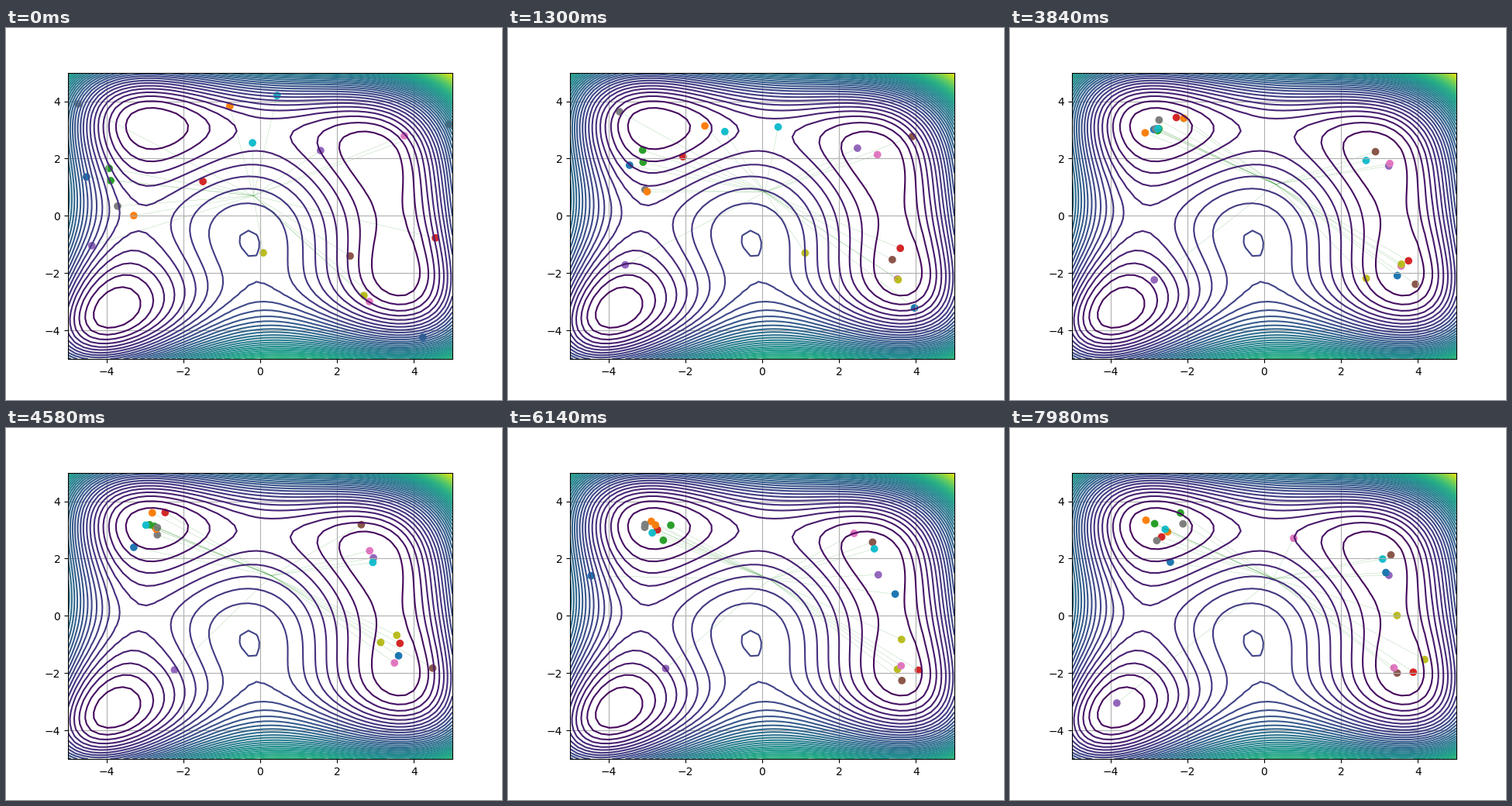
Recreate the animation shown at these times as a matplotlib script. Size 640 by 480 pixels, loop 8 s.

```python
import numpy as np
import matplotlib.pyplot as plt
from matplotlib.animation import FuncAnimation
from matplotlib.collections import LineCollection

STEP = 20      # ms per frame
FRAMES = 400
SPEED = 0.85   # descent speed, units per second
NOISE = 0.9    # strength of the random drift once settled
MEMORY = 0.4   # how long a drift lasts, in s

# starting swarm in colour order, two rounds of ten
START = np.array([
    (-4.52, 1.36), (-0.79, 3.83), (-3.93, 1.66), (-1.49, 1.20), (1.57, 2.28),
    (4.92, 3.20), (3.75, 2.80), (-3.71, 0.34), (0.08, -1.29), (0.44, 4.20),
    (4.23, -4.24), (-3.29, 0.01), (-3.89, 1.23), (4.56, -0.77), (-4.38, -1.04),
    (2.34, -1.40), (2.84, -2.99), (-4.74, 3.91), (2.70, -2.78), (-0.20, 2.55),
])


def himmelblau(x, y):
    return (x**2 + y - 11) ** 2 + (x + y**2 - 7) ** 2


def gradient(p):
    x, y = p.T
    a, b = x**2 + y - 11, x + y**2 - 7
    return np.column_stack([4 * x * a + 2 * b, 2 * a + 4 * y * b])


def descend():
    """Walk downhill at even speed, with random drift growing over time."""
    rng = np.random.default_rng(4)
    dt = STEP / 1000
    keep = np.exp(-dt / MEMORY)
    pos, drift = START.copy(), np.zeros_like(START)
    path = [pos]
    for i in range(1, FRAMES):
        g = gradient(pos)
        slope = np.linalg.norm(g, axis=1, keepdims=True)
        drift = keep * drift + np.sqrt(1 - keep**2) * rng.normal(size=pos.shape)
        level = NOISE * min(1, i * dt / 3) ** 2
        pos = pos + dt * (level * drift - SPEED * g / (slope + 2))
        path.append(pos)
    return path


def static_layer():
    """Render contours, grid and axes once on a transparent ground."""
    s = np.linspace(-5, 5, 50)
    x, y = np.meshgrid(s, s)
    ax.contour(x, y, himmelblau(x, y), 50)
    ax.grid(True)
    fig.patch.set_alpha(0)
    ax.patch.set_alpha(0)
    fig.canvas.draw()
    layer = np.array(fig.canvas.buffer_rgba())
    ax.clear()
    ax.axis("off")
    ax.set(xlim=(-5, 5), ylim=(-5, 5))
    fig.patch.set_alpha(1)
    fig.figimage(layer, zorder=3)


fig, ax = plt.subplots(figsize=(6.4, 4.8), dpi=100)
static_layer()
path = descend()
dots = ax.scatter(*START.T, c=[f"C{i % 10}" for i in range(20)], zorder=1)
rays = ax.add_collection(
    LineCollection([], colors="g", linewidths=0.1, zorder=2), autolim=False)


def update(i):
    pos = path[max(i - 1, 0)]
    centre = pos.mean(axis=0)
    dots.set_offsets(pos)
    rays.set_segments([(centre, p) for p in pos])
    return dots, rays


anim = FuncAnimation(fig, update, frames=FRAMES, interval=STEP,
                     repeat=True, repeat_delay=0)
plt.show()
```
